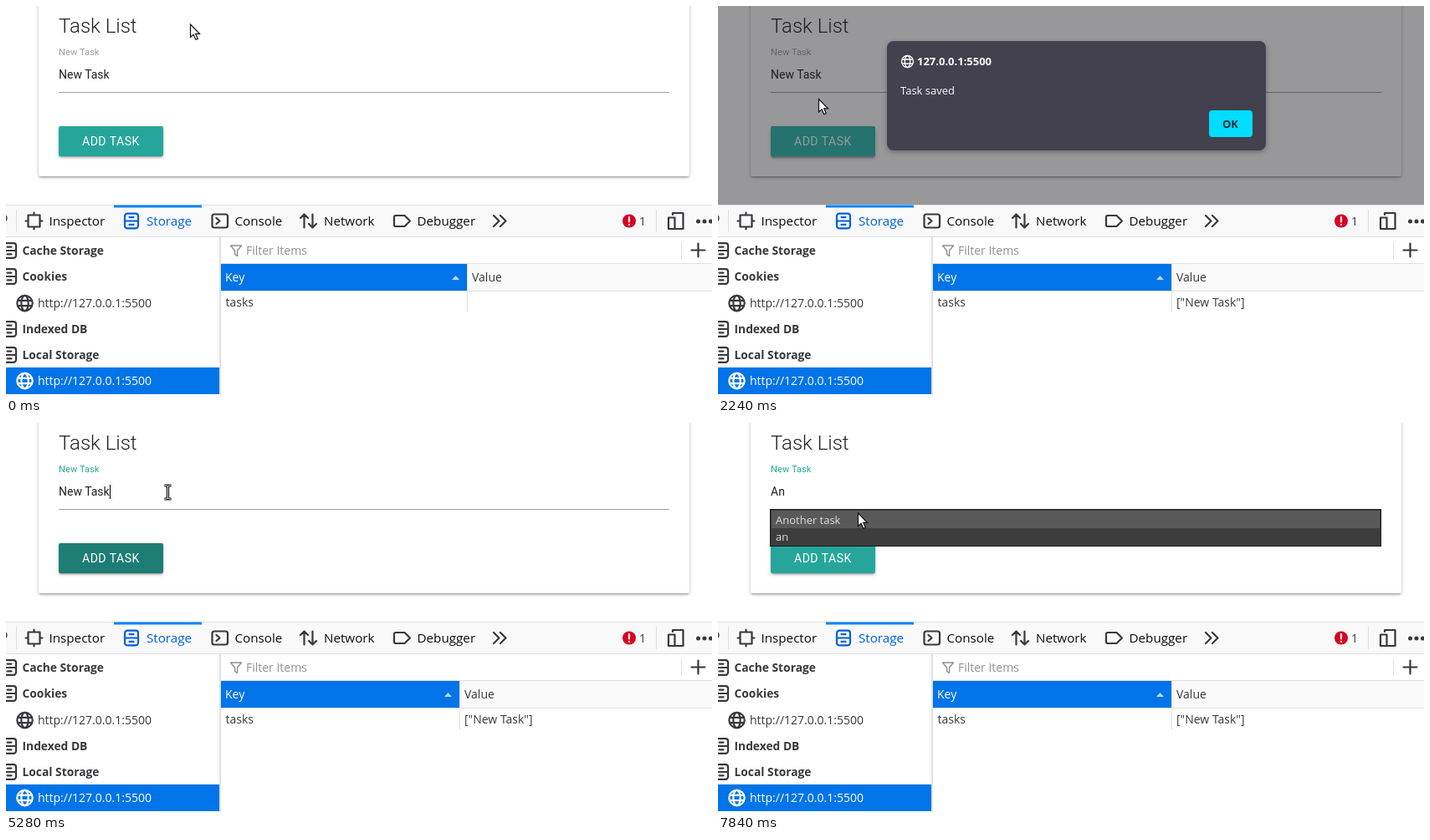
Animation, 844 px wide and 466 px high, one loop 8 s. Source, as an HTML page:

```html
<!DOCTYPE html>
<html lang="en">
<head>
<meta charset="utf-8">
<title>Task List</title>
<style>
html, body { margin: 0; width: 100%; height: 100%; overflow: hidden; background: #fff; }
body { position: relative; }
div, svg { position: absolute; box-sizing: border-box; }
svg { left: 0; top: 0; overflow: visible; }
#card {
  left: 39px; top: -40px; width: 778px; height: 244px; border-radius: 2px; background: #fff;
  box-shadow: 0 2px 2px rgba(0,0,0,.14), 0 3px 1px -2px rgba(0,0,0,.12), 0 1px 5px rgba(0,0,0,.2);
}
#btn {
  left: 63px; top: 144px; width: 125px; height: 36px; border-radius: 2px;
  box-shadow: 0 2px 2px rgba(0,0,0,.14), 0 3px 1px -2px rgba(0,0,0,.12), 0 1px 5px rgba(0,0,0,.2);
}
#btn.raised { box-shadow: 0 3px 3px rgba(0,0,0,.14), 0 1px 7px rgba(0,0,0,.12), 0 3px 1px -1px rgba(0,0,0,.2); }
#veil { left: 0; top: 0; width: 844px; height: 238px; background: rgba(28,27,34,.45); }
#dialog {
  left: 202px; top: 42px; width: 453px; height: 131px; border-radius: 8px;
  background: #42414d; box-shadow: 0 2px 6px rgba(0,0,0,.3);
}
#ok { left: 385px; top: 83px; width: 52px; height: 32px; border-radius: 4px; }
#popup { left: 62px; top: 103px; width: 731px; background: #3d3d3d; border: 1px solid #1c1c1c; overflow: hidden; }
#hot { left: 1px; top: 1px; width: 727px; height: 21px; background: #595959; }
.page { font: 14px Roboto, sans-serif; fill: rgba(0,0,0,.87); }
.ui { font: 14px "Open Sans", "Noto Sans", sans-serif; fill: #38383d; }
.tab { font-size: 15.2px; fill: #0c0c0d; }
.b { font-weight: 700; font-size: 13.8px; }
.s { font-size: 13px; }
.icon { fill: none; stroke: #38383d; stroke-width: 2.2; stroke-linejoin: round; stroke-linecap: round; }
.rule { fill: #e0e0e2; }
</style>
</head>
<body>
<div id="card"></div>
<div id="btn"></div>
<svg class="page" width="844" height="238">
  <text x="63" y="32" font-size="24" font-weight="300">Task List</text>
  <text id="label" x="63" y="59" font-size="11.2">New Task</text>
  <rect id="sel" x="63" y="74" width="61" height="17" fill="#e95420"/>
  <text id="input" x="63" y="87"></text>
  <rect id="caret" y="74" width="1" height="17" fill="#000"/>
  <rect id="line" x="63" y="103" width="730" height="1"/>
  <rect id="glow" x="63" y="104" width="730" height="1" fill="#26a69a"/>
  <text x="91" y="167" fill="#fff" letter-spacing=".5">ADD TASK</text>
</svg>

<svg class="ui" width="844" height="466">
  <defs>
    <g id="globe" class="icon">
      <circle r="9.2"/><ellipse rx="4.2" ry="9.2"/><path d="M-8.4-3.2H8.4M-8.4 3.2H8.4"/>
    </g>
    <g id="store">
      <rect x="-8" y="-8.8" width="16" height="17.6" rx="3"/><path d="M-8 0H8M-2.5-4.4h5M-2.5 4.4h5"/>
    </g>
  </defs>
  <rect y="238" width="844" height="228" fill="#fff"/>
  <rect y="238" width="844" height="39" fill="#f9f9fa"/>
  <g class="rule">
    <rect y="238" width="844" height="1"/><rect y="276" width="844" height="1"/>
    <rect x="12" y="244" width="1" height="27"/><rect x="777" y="244" width="1" height="27"/>
    <rect x="255" y="277" width="2" height="189"/><rect x="807" y="283" width="1" height="20"/>
    <rect x="257" y="308" width="587" height="1"/>
  </g>
  <rect x="129" y="238.5" width="105" height="3" fill="#0a84ff"/>

  <g class="icon">
    <path d="M-2 251q3.500 .500 2 5.500"/>
    <path d="M26.500 250.500h14v14h-14zM33.500 247.500v3M33.500 264.500v3M23.500 257.500h3M40.500 257.500h3"/>
    <use href="#store" x="150" y="257.500" stroke="#0060df"/>
    <rect x="246.500" y="249.500" width="18.500" height="16" rx="2.500"/><path d="M251.500 254l4 3.500-4 3.500"/>
    <path d="M356.500 265.500V249.500M352 254l4.500-4.500 4.500 4.500M366.500 249.500v16M362 261l4.500 4.500 4.500-4.500"/>
    <path d="M466 251h10.500l6.500 6.500-6.500 6.500H466q-2 0-2-2v-9q0-2 2-2z"/>
    <path d="M583 251l6.500 6.500-6.500 6.500M591 251l6.500 6.500-6.500 6.500"/>
    <path d="M797 250v-2h12.500v19H801M792 253.500h7.500v13.500H792z"/>
    <path d="M819.500 292.500h16M827.500 284.500v16"/>
  </g>
  <circle cx="745" cy="257.500" r="8" fill="#d70022"/>
  <path d="M745 253v5.500M745 261.800v.200" stroke="#fff" stroke-width="2.200" stroke-linecap="round"/>
  <g fill="#38383d"><circle cx="827.500" cy="258" r="2.500"/><circle cx="835" cy="258" r="2.500"/><circle cx="842.500" cy="258" r="2.500"/></g>
  <g class="tab">
    <text x="51.500" y="263">Inspector</text>
    <text x="168" y="263" fill="#0060df">Storage</text>
    <text x="273.500" y="263">Console</text>
    <text x="380" y="263">Network</text>
    <text x="491.500" y="263">Debugger</text>
  </g>
  <text x="757" y="263">1</text>

  <rect y="433" width="255" height="32" fill="#0074e8"/>
  <g id="tree"></g>
  <use href="#globe" x="22.500" y="356"/><text x="38" y="361">http://127.0.0.1:5500</text>
  <g style="--c:#fff"><use href="#globe" x="22.500" y="449" id="on"/></g>
  <text x="38" y="454" fill="#fff">http://127.0.0.1:5500</text>

  <path d="M268.500 287h13l-5 6v6.500l-3-2v-4.500z" fill="none" stroke="#8f8f94" stroke-width="1.500" stroke-linejoin="round"/>
  <text x="287" y="298" fill="#8f8f94">Filter Items</text>
  <rect x="257" y="309" width="587" height="32" fill="#f9f9fa"/>
  <rect x="257" y="341" width="587" height="1" class="rule"/>
  <rect id="flash" x="257" y="342" width="587" height="26" fill="#e6b064"/>
  <rect id="key" x="257" y="309" height="32" fill="#0074e8"/>
  <text x="262" y="330" fill="#fff">Key</text>
  <text x="262.500" y="360">tasks</text>
  <g id="col">
    <rect y="309" width="1" height="58" class="rule"/>
    <path d="M-18 328l4.500-5 4.500 5z" fill="#b8dcff"/>
    <text x="6" y="330">Value</text>
    <text id="value" x="6" y="360">["New Task"]</text>
  </g>
</svg>

<div id="veil"></div>
<div id="dialog">
  <div id="ok"></div>
  <svg class="ui s" width="453" height="131" style="fill:#fbfbfe">
    <g fill="none" stroke="#fbfbfe" stroke-width="1.300">
      <circle cx="24.500" cy="24.500" r="7"/><ellipse cx="24.500" cy="24.500" rx="3.200" ry="7"/>
      <path d="M18 22h13M18 27h13"/>
    </g>
    <text x="36" y="29" font-weight="700">127.0.0.1:5500</text>
    <text x="16" y="64">Task saved</text>
    <text x="401" y="104" font-weight="700" fill="#2b2a33">OK</text>
  </svg>
</div>
<div id="popup">
  <div id="hot"></div>
  <svg class="ui s" width="729" height="64" style="fill:#dedede">
    <text x="6" y="17">Another task</text>
    <text id="row2" x="6" y="37"></text>
    <text id="row3" x="6" y="57">an</text>
  </svg>
</div>
<svg width="844" height="466">
  <g id="arrow"><path d="M0 0V15.500L3.600 12.300 6.300 18.300 8.800 17.200 6.200 11.300H11z" fill="#fff" stroke="#111" stroke-width="1.200"/></g>
  <g id="beam" fill="none">
    <path d="M-4-8h3L0-7 1-8h3M0-7V7M-4 8h3L0 7 1 8h3" stroke="#000" stroke-width="3.200"/>
    <path d="M-3.500-8h2.500L0-7 1-8h2.500M0-7V7M-3.500 8h2.500L0 7 1 8h2.500" stroke="#fff" stroke-width="1"/>
  </g>
  <g id="hand"><path d="M-1.500 9V0q1.500-2.500 3 0v6l8 1.500q2 .500 2 2.500l-1 6H1l-4.500-6q.500-2 2-1z" fill="#fff" stroke="#111" stroke-width="1.200"/></g>
</svg>

<script>
const LOOP = 8000, STEP = 40;
const $ = id => document.getElementById(id);
const show = (id, on) => { $(id).style.display = on ? '' : 'none'; };
const ramp = (t, from, span) => Math.min(1, Math.max(0, (t - from) / span));
const smooth = u => u * u * (3 - 2 * u);
const mix = (a, b, u) => `rgb(${a.map((v, i) => Math.round(v + (b[i] - v) * u))})`;

const GREY = [158, 158, 158], TEAL = [38, 166, 154], HOVER = [43, 187, 173], FOCUS = [29, 125, 116];

// pointer path: time, x, y
const PATH = [
  [320, 220.5, 22], [1000, 125.5, 165], [1880, 125.5, 165], [2080, 115, 134], [2240, 120.5, 111.5],
  [2680, 570, 132], [2760, 570, 132], [3040, 611, 143], [3280, 611, 143], [3520, 562, 136],
  [3840, 216.5, 66], [4360, 82, 80], [4400, 82, 80], [4480, 194, 80], [4640, 194, 80],
  [4880, 97, 85], [5120, 193.5, 83], [5280, 193.5, 83], [5720, 191.5, 81], [7520, 191.5, 81], [7840, 167.5, 108]
];
// button colours: start of fade, from, to
const FADES = [[800, TEAL, HOVER], [3400, HOVER, FOCUS], [5280, FOCUS, TEAL]];

const OPEN = 1600, CLOSE = 3400, STORED = 1720, CLICK = 5280, SELECT = 5480, TYPE = 6720;

$('on').style.filter = 'invert(1) brightness(2)';
[['Cache Storage', 293], ['Cookies', 324], ['Indexed DB', 387], ['Local Storage', 418]].forEach(([name, y]) => {
  $('tree').innerHTML += `<use href="#store" x="4" y="${y}" class="icon"/><text class="b" x="19.500" y="${y + 5}">${name}</text>`;
});

function pointer(t) {
  const i = PATH.findIndex(p => p[0] > t);
  if (i === 0) return PATH[0].slice(1);
  if (i < 0) return PATH[PATH.length - 1].slice(1);
  const [t0, x0, y0] = PATH[i - 1], [t1, x1, y1] = PATH[i];
  const u = smooth((t - t0) / (t1 - t0));
  return [x0 + (x1 - x0) * u, y0 + (y1 - y0) * u];
}

function drawPointer(t, x, y) {
  const free = t < 1240 || (t >= CLOSE && t < TYPE);
  const inside = (l, top, r, b) => x >= l && x <= r && y >= top && y <= b;
  const kind = free && inside(63, 61, 793, 103) ? 'beam' : free && inside(63, 144, 188, 180) ? 'hand' : 'arrow';
  for (const id of ['arrow', 'beam', 'hand']) show(id, id === kind);
  $(kind).setAttribute('transform', `translate(${x} ${y})`);
}

function drawForm(t) {
  const [from, a, b] = FADES.filter(f => f[0] <= t).pop() || FADES[0];
  $('btn').style.background = mix(a, b, ramp(t, from, 200));
  $('btn').className = t >= 880 && t < CLOSE ? 'raised' : '';

  const focus = smooth(ramp(t, CLICK, 300));
  $('label').setAttribute('fill', mix(GREY, TEAL, t >= CLICK ? 1 : 0));
  $('line').setAttribute('fill', mix(GREY, TEAL, focus));
  $('glow').setAttribute('opacity', focus);

  const selected = t >= SELECT && t < TYPE;
  show('sel', selected);
  $('input').textContent = t < TYPE ? 'New Task' : t < TYPE + 40 ? 'A' : 'An';
  $('input').setAttribute('fill', selected ? '#fff' : 'rgba(0,0,0,.87)');
  show('caret', (t >= CLICK && t < SELECT) || (t >= TYPE && t < 7600));
  $('caret').setAttribute('x', t < TYPE ? 124 : t < TYPE + 40 ? 72 : 80);
}

function drawTable(t) {
  const stored = t >= STORED, edge = stored ? 542 : 551;
  $('key').setAttribute('width', edge - 257);
  $('col').setAttribute('transform', `translate(${edge} 0)`);
  show('value', stored);
  $('flash').setAttribute('opacity', stored ? 1 - ramp(t, 1840, 360) : 0);
}

function drawOverlays(t, x, y) {
  show('veil', t >= OPEN && t < CLOSE);
  show('dialog', t >= 1880 && t < CLOSE);
  $('dialog').style.opacity = ramp(t, 1840, 120);
  $('ok').style.background = x >= 587 && x <= 639 && y >= 125 ? '#80ebff' : '#00ddff';

  const long = t < TYPE + 120;
  show('popup', t >= TYPE);
  $('popup').style.height = long ? '65px' : '45px';
  $('row2').textContent = long ? 'aaaaa' : 'an';
  show('row3', long);
  show('hot', y > 104);
}

function draw(now) {
  const t = Math.floor((now % LOOP) / STEP) * STEP;
  const [x, y] = pointer(t);
  drawForm(t);
  drawTable(t);
  drawOverlays(t, x, y);
  drawPointer(t, x, y);
}

const start = performance.now();
(function tick() {
  draw(performance.now() - start);
  requestAnimationFrame(tick);
})();
</script>
</body>
</html>
```
